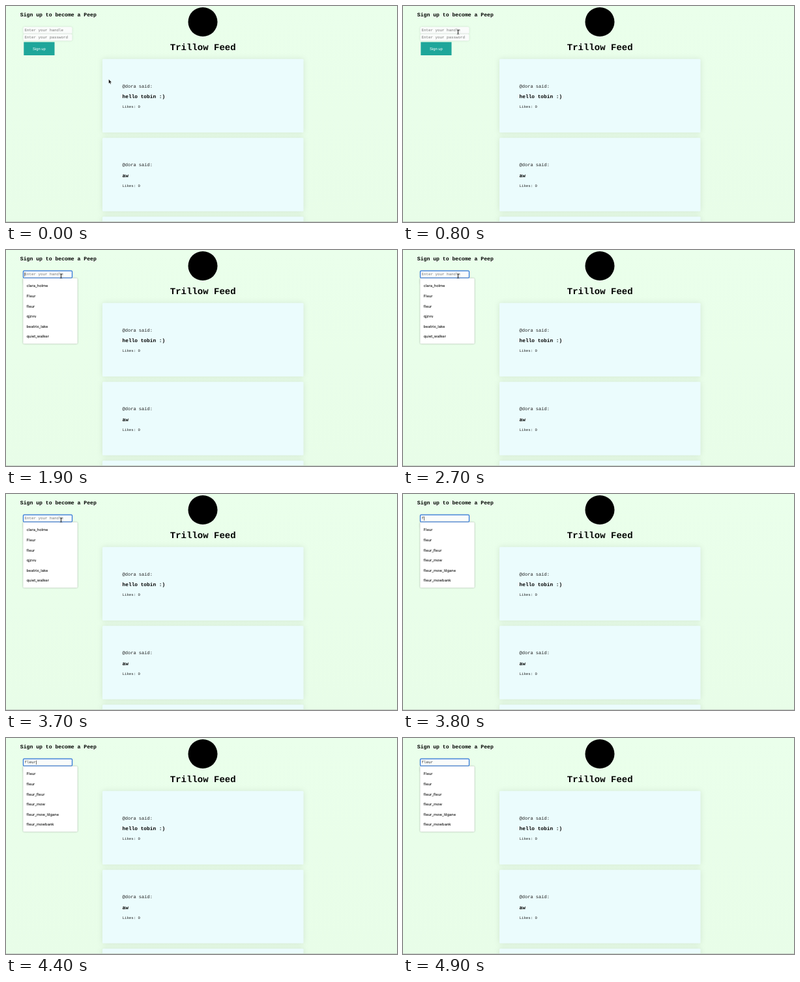
Recreate the animation shown at these times as an HTML page. Size 600 px wide and 333 px high, loop 5 s.

```html
<!DOCTYPE html>
<html lang="en">
<head>
<meta charset="utf-8">
<title>Trillow Feed</title>
<style>
  html, body { margin: 0; width: 100%; height: 100%; overflow: hidden; }
  svg { display: block; width: 600px; height: 333px; }
  text {
    font-family: "Liberation Mono", "Courier New", monospace;
    text-rendering: geometricPrecision;
    white-space: pre;
  }
  .title { font-size: 14.03px; font-weight: bold; text-anchor: middle; }
  .signup { font-size: 8.15px; font-weight: bold; }
  .author { font-size: 7.02px; fill: #222; }
  .peep { font-size: 7.8px; font-weight: bold; }
  .likes { font-size: 5.7px; fill: #222; }
  .field text { font-size: 5.85px; fill: #777; }
  .field rect { fill: #fafcfb; filter: drop-shadow(0 0 1.5px #0002); }
  .button { font: 5.85px "Liberation Sans", Arial, sans-serif; fill: #fff; }
  .card { fill: #ebfcfd; filter: drop-shadow(0 0 4px #00000018); }
  .list rect { fill: #fff; filter: drop-shadow(0 .6px .8px #0005); }
  .list text { font: 500 5.7px Inter, Roboto, sans-serif; fill: #111; }
</style>
</head>
<body>
<svg viewBox="0 0 600 333">
  <defs>
    <linearGradient id="mint" x2="0" y2="1">
      <stop stop-color="#eaffeb"/>
      <stop offset="1" stop-color="#e8fde8"/>
    </linearGradient>
  </defs>
  <rect width="600" height="333" fill="url(#mint)"/>
  <circle cx="302" cy="24.5" r="22.5"/>
  <text class="title" x="302.2" y="68.3">Trillow Feed</text>
  <text class="signup" x="21.8" y="16.4">Sign up to become a Peep</text>
  <g id="cards"></g>
  <rect y="332" width="600" height="1" fill="#c5d2c6"/>

  <g class="field">
    <rect x="26.5" y="32.3" width="75" height="10.4" rx="2"/>
    <rect x="26.5" y="43.2" width="75" height="10.2" rx="2"/>
    <text id="handle" x="28.4" y="39.4"></text>
    <text x="28.4" y="50.1">Enter your password</text>
  </g>
  <rect x="27.3" y="55.6" width="47.2" height="20.4" fill="#1ea69a"/>
  <text class="button" x="41" y="67.8">Sign up</text>

  <g id="focus">
    <g class="list">
      <rect x="26.3" y="43.4" width="83.4" height="101.2" rx="1.5"/>
      <g id="items"></g>
    </g>
    <rect x="26.5" y="32.2" width="75" height="10.8" rx="1.2" fill="none" stroke="#2c74dc" stroke-width="1.2"/>
  </g>
  <rect id="caret" y="34.6" width=".6" height="6.2" fill="#111"/>
  <path id="arrow" d="M0 0V6.6L1.5 5.2L2.5 7.6L3.6 7.1L2.6 4.8H4.6Z" stroke="#fff" stroke-width=".4"/>
  <path id="beam" d="M82.9 36.7Q84.5 36.7 84.5 37.8Q84.5 36.7 86.1 36.7M84.5 37.6V42.6M82.9 43.4Q84.5 43.4 84.5 42.3Q84.5 43.4 86.1 43.4M83.8 40.5H85.2" fill="none" stroke="#111" stroke-width=".75"/>
</svg>
<script>
const $ = id => document.getElementById(id);
const LOOP = 5000, PITCH = 121.5, CHAR = 3.51;
const recent = ["clara_holme", "Fleur", "fleur", "qjzvu", "beatrix_lake", "quiet_walker"];
const matches = ["Fleur", "fleur", "fleur_fleur", "fleur_mow", "fleur_mow_tilgane", "fleur_mowbank"];
const keyTimes = [3800, 3900, 4100, 4300, 4400];
const blinks = [1100, 1400, 1900, 2400, 2900, 3400, 3800, 4900];

const card = (message, i) => `<g transform="translate(0 ${i * PITCH})">
  <rect class="card" x="148" y="81.7" width="308.5" height="113.2" rx="1.5"/>
  <text class="author" x="178.6" y="125.6">@dora said:</text>
  <text class="peep" x="178.6" y="142.2">${message}</text>
  <text class="likes" x="178.6" y="157.1">Likes: 0</text></g>`;
$("cards").innerHTML = ["hello tobin :)", "aw", ""].map(card).join("");

const listItems = names => names.map((name, i) =>
  `<text x="31.6" y="${57.3 + i * 15.6}">${name}</text>`).join("");
const show = (id, on) => $(id).setAttribute("visibility", on ? "visible" : "hidden");
const passed = (times, t) => times.filter(time => t >= time).length;

let lastNames;
function draw(t) {
  const typed = passed(keyTimes, t);
  const handle = $("handle");
  handle.textContent = typed ? "fleur".slice(0, typed) : "Enter your handle";
  handle.style.fill = typed ? "#333" : "#777";

  const names = typed ? matches : recent;
  if (names !== lastNames) $("items").innerHTML = listItems(names);
  lastNames = names;

  show("focus", t >= 1100);
  show("caret", passed(blinks, t) % 2);
  $("caret").setAttribute("x", 28.5 + typed * CHAR);

  show("arrow", t < 800);
  $("arrow").setAttribute("transform", t < 100 ? "translate(157.6 113)" : "translate(125.7 100.9)");
  show("beam", t >= 800 && !typed);
}

function tick() {
  draw(performance.now() % LOOP);
  requestAnimationFrame(tick);
}
tick();
</script>
</body>
</html>
```
